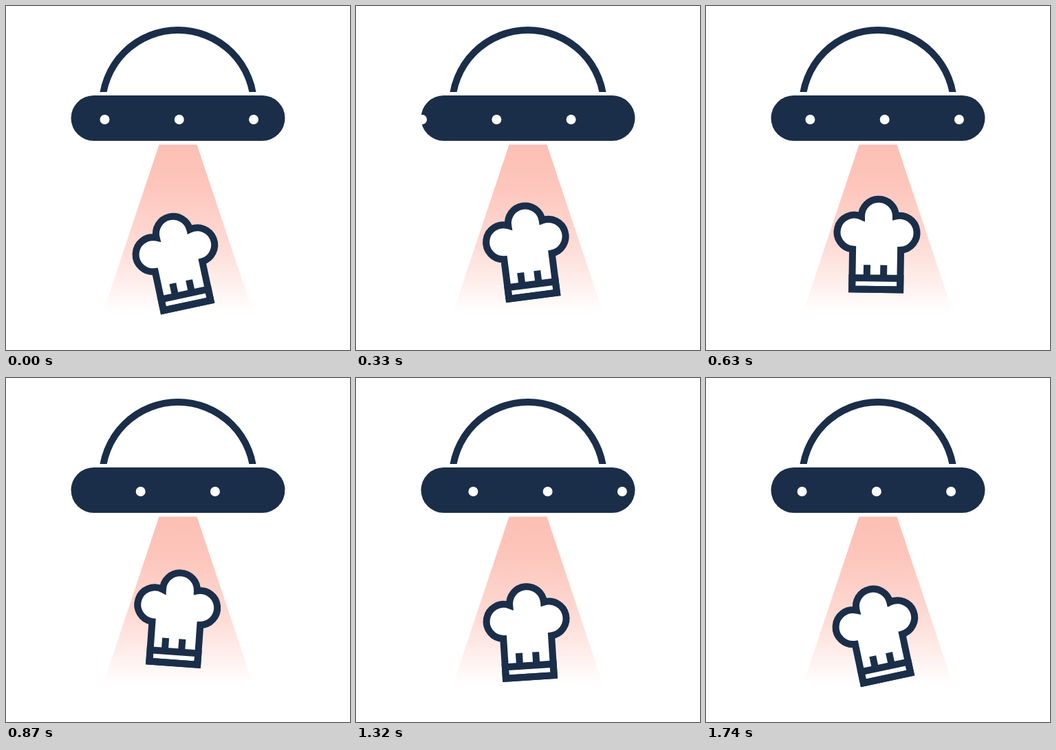
These frames come from a looping animation (500 px wide and 500 px high, 1.77 s). An HTML page:

```html
<!DOCTYPE html>
<html lang="en">
<head>
<meta charset="utf-8">
<title>Chef hat abduction</title>
<style>
  html, body { margin: 0; width: 100%; height: 100%; overflow: hidden; background: #fff; }
  svg { display: block; width: 100%; height: 100%; }
  .line { fill: none; stroke: #1a2e49; stroke-width: 10; stroke-miterlimit: 6; }
  .line.solid { fill: #fff; }
</style>
</head>
<body>
<svg viewBox="0 0 500 500">
  <defs>
    <linearGradient id="glow" x1="0" y1="201" x2="0" y2="450" gradientUnits="userSpaceOnUse">
      <stop offset="0" stop-color="#fcbfb4"/>
      <stop offset=".25" stop-color="#fdc6bc"/>
      <stop offset=".6" stop-color="#fedcd6"/>
      <stop offset=".8" stop-color="#feeeeb"/>
      <stop offset=".98" stop-color="#fff"/>
    </linearGradient>
    <clipPath id="aboveHull"><rect width="500" height="125"/></clipPath>
  </defs>

  <path fill="url(#glow)" d="M222.5 201.5H277.5L360.5 450H139.5Z"/>
  <circle class="line" cx="250" cy="145.3" r="110.3" clip-path="url(#aboveHull)"/>
  <rect x="94.5" y="130" width="311" height="66" rx="33" fill="#1a2e49"/>
  <g id="lights" fill="#fff"></g>

  <g id="hat">
    <path class="line solid" d="M-36.5 70.7V12.9A25 25 0 1 1 -24.4 -34.9A25 25 0 0 1 25.6 -36.3A25 25 0 1 1 33.5 12.9V70.7Z"/>
    <path class="line" d="M-36.5 54.2H33.5V70.7H-36.5ZM-15.2 35.2V54M9.1 35.2V54"/>
  </g>
</svg>
<script>
  const LOOP = 1770, STEP = 30;
  const LIGHT_GAP = 108.25, LIGHT_SPEED = 0.1844;
  const hat = document.getElementById('hat');
  const lightGroup = document.getElementById('lights');

  const lights = Array.from({ length: 4 }, () => {
    const light = document.createElementNS('http://www.w3.org/2000/svg', 'circle');
    light.setAttribute('cy', 165);
    light.setAttribute('r', 7);
    return lightGroup.appendChild(light);
  });

  // Cosine swing: base - size at time start, base + size half a loop later.
  const swing = (t, base, size, start) =>
    base - size * Math.cos(2 * Math.PI * (t - start) / LOOP);

  function render(t) {
    const first = (143.5 + LIGHT_SPEED * t) % LIGHT_GAP;
    lights.forEach((light, i) => light.setAttribute('cx', first + i * LIGHT_GAP));

    const y = swing(t, 355, 14, 688);
    const angle = swing(t, -4, 8.1, 3);
    hat.setAttribute('transform', `translate(249.8 ${y}) rotate(${angle})`);
  }

  const begin = performance.now();
  function tick() {
    const t = (performance.now() - begin) % LOOP;
    render(Math.floor(t / STEP) * STEP);
    requestAnimationFrame(tick);
  }
  tick();
</script>
</body>
</html>
```
